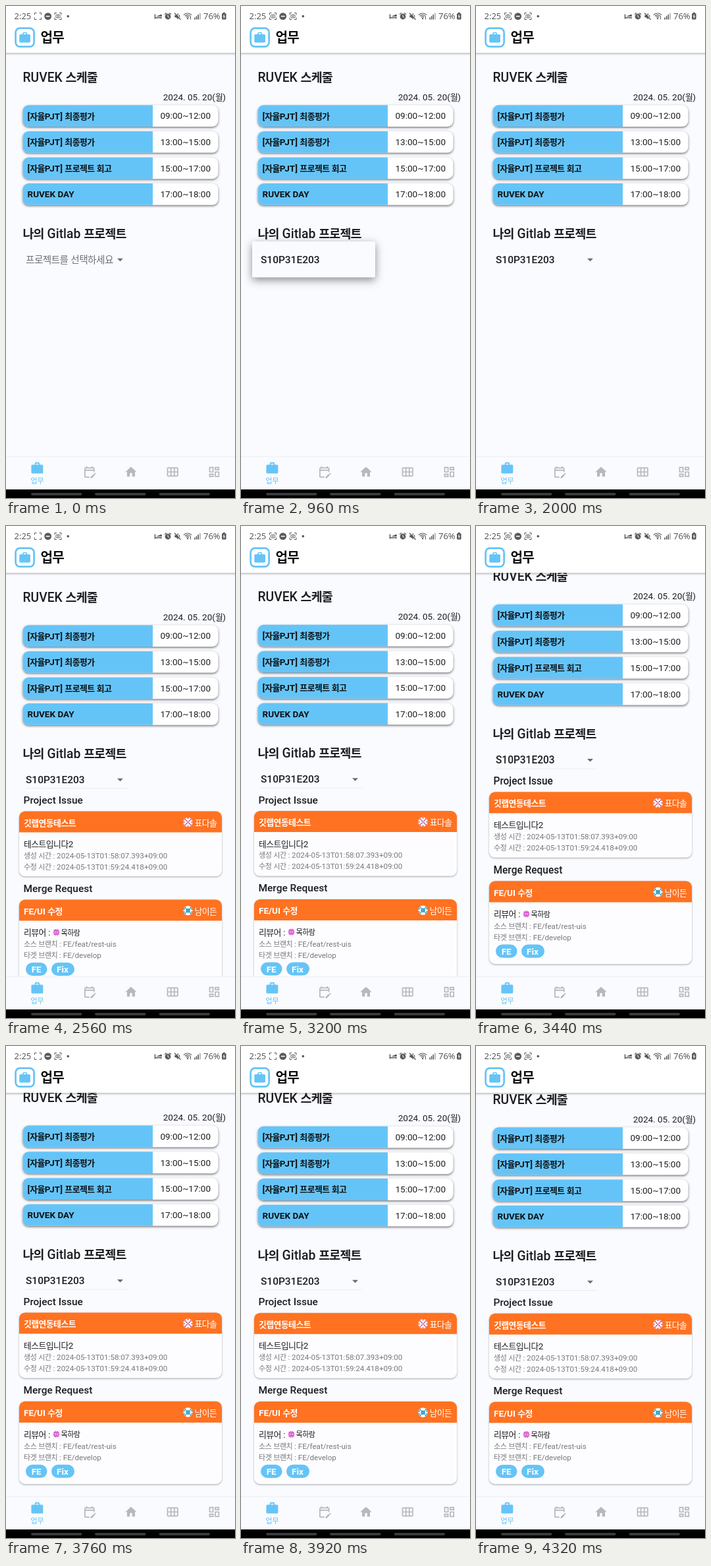
Animation of 348 by 746 pixels, one loop 4480 ms. Source, as an HTML page with a canvas:

```html
<!DOCTYPE html>
<html lang="ko">
<head>
<meta charset="utf-8">
<title>업무</title>
<style>
html, body { margin: 0; width: 100%; height: 100%; overflow: hidden; background: #fafbff; }
canvas { display: block; width: 348px; height: 746px; }
</style>
</head>
<body>
<canvas id="stage" width="348" height="746"></canvas>
<script>
const ctx = document.getElementById('stage').getContext('2d');
const LOOP = 4480, STEP = 80;
const BLUE = '#65c4f7', ORANGE = '#ff7221', PAGE = '#fafbff', GREY = '#b7b8bc', STATUS = '#58595d';
const INK = '#1c1d20', FAINT = '#77787c';
const TOP = 72, BOTTOM = 683;

const icons = {
  work: 'M20 6h-4V4c0-1.11-.89-2-2-2h-4c-1.11 0-2 .89-2 2v2H4c-1.11 0-1.99.89-1.99 2L2 19c0 1.11.89 2 2 2h16c1.11 0 2-.89 2-2V8c0-1.11-.89-2-2-2zm-6 0h-4V4h4v2z',
  plan: 'M12 22H5c-1.11 0-2-.9-2-2l.01-14c0-1.1.88-2 1.99-2h1V2h2v2h8V2h2v2h1c1.1 0 2 .9 2 2v6h-2v-2H5v10h7v2zM5 8h14V6H5zm17.13 8.99.71-.71c.39-.39.39-1.02 0-1.41l-.71-.71c-.39-.39-1.02-.39-1.41 0l-.71.71 2.12 2.12zm-.71.71-5.3 5.3H14v-2.12l5.3-5.3 2.12 2.12z',
  home: 'M10 20v-6h4v6h5v-8h3L12 3 2 12h3v8z',
  grid: 'M20 4H4c-1.1 0-2 .9-2 2v12c0 1.1.9 2 2 2h16c1.1 0 2-.9 2-2V6c0-1.1-.9-2-2-2zM8 11H4V6h4v5zm6 0h-4V6h4v5zm6 0h-4V6h4v5zM8 18H4v-5h4v5zm6 0h-4v-5h4v5zm6 0h-4v-5h4v5z',
  board: 'M21 3h-8v6h8zM19 5v2h-4V5zM11 3H3v10h8zM9 5v6H5V5zM21 11h-8v10h8zM19 13v6h-4v-6zM11 15H3v6h8zM9 17v2H5v-2z',
  mute: 'M3 9v6h4l6 6V3L7 9zM15 7q6 5 0 10z',
  bed: 'M1 8h3v9h19v4h-3v-1H4v2H1zM6 15 22 8q2 3 1 7z'
};

// Linear interpolation through [time, value] points
function track(t, points) {
  if (t <= points[0][0]) return points[0][1];
  for (let i = 1; i < points.length; i++) {
    const [t0, v0] = points[i - 1], [t1, v1] = points[i];
    if (t <= t1) return v0 + (v1 - v0) * (t - t0) / (t1 - t0);
  }
  return points[points.length - 1][1];
}

// Hangul runs are set slightly smaller and tighter than Latin; y is the middle of the line
function text(str, x, y, size, color = INK, weight = 400) {
  ctx.fillStyle = color;
  for (const run of str.match(/[가-힣]+|[^가-힣]+/g)) {
    const hangul = /[가-힣]/.test(run);
    const w = hangul && weight > 400 ? 700 : weight;
    ctx.font = hangul
      ? `${w} ${size * 0.95}px "Noto Sans CJK KR", "Noto Sans CJK", sans-serif`
      : `${w} ${size}px Roboto, sans-serif`;
    ctx.letterSpacing = hangul ? `${-size * 0.04}px` : '0px';
    ctx.fillText(run, x, y + size * 0.355);
    x += ctx.measureText(run).width;
  }
  ctx.letterSpacing = '0px';
}

function box(x, y, w, h, r, color) {
  ctx.beginPath();
  ctx.roundRect(x, y, w, h, r);
  ctx.fillStyle = color;
  ctx.fill();
}

function raised(x, y, w, h, r, color, shade, blur, drop) {
  ctx.save();
  ctx.shadowColor = `rgba(0,0,0,${shade})`;
  ctx.shadowBlur = blur;
  ctx.shadowOffsetY = drop;
  box(x, y, w, h, r, color);
  ctx.restore();
}

function disc(x, y, r, color) {
  ctx.beginPath();
  ctx.arc(x, y, r, 0, 7);
  ctx.fillStyle = color;
  ctx.fill();
}

function line(color, width, ...pts) {
  ctx.beginPath();
  for (let i = 0; i < pts.length; i += 2) ctx.lineTo(pts[i], pts[i + 1]);
  ctx.strokeStyle = color;
  ctx.lineWidth = width;
  ctx.stroke();
}

function icon(name, cx, cy, size, color) {
  ctx.save();
  ctx.translate(cx - size / 2, cy - size / 2);
  ctx.scale(size / 24, size / 24);
  ctx.fillStyle = color;
  ctx.fill(new Path2D(icons[name]), 'evenodd');
  ctx.restore();
}

// Mirrored block pattern; each mask holds the rows of one column
function avatar(cx, cy, r, color, masks) {
  ctx.save();
  disc(cx, cy, r, '#fff');
  ctx.clip();
  ctx.fillStyle = color;
  const u = r * 2 / 7;
  for (let c = 0; c < 7; c++)
    for (let row = 0; row < 7; row++)
      if (masks[Math.min(c, 6 - c)] >> row & 1)
        ctx.fillRect(cx - r + c * u, cy - r + row * u, u + 0.1, u + 0.1);
  ctx.restore();
}

function schedule() {
  text('RUVEK 스케줄', 25.5, 108, 19.33, INK, 500);
  text('2024. 05. 20(월)', 238.7, 138, 13.53);
  const rows = [
    ['[자율PJT] 최종평가', '09:00~12:00'],
    ['[자율PJT] 최종평가', '13:00~15:00'],
    ['[자율PJT] 프로젝트 회고', '15:00~17:00'],
    ['RUVEK DAY', '17:00~18:00']
  ];
  rows.forEach(([name, time], i) => {
    const y = 150.3 + i * 39.6;
    raised(25.5, y, 297, 32.7, 9, '#fff', 0.55, 3.5, 1.5);
    box(25.5, y, 197.5, 32.7, [9, 0, 0, 9], BLUE);
    text(name, 32.5, y + 16.5, 13.53, '#0d1114', 700);
    text(time, 234.5, y + 16.3, 13.53);
  });
}

function picker(chosen, loaded) {
  text('나의 Gitlab 프로젝트', 25.5, 344.8, 19.33, INK, 500);
  if (chosen) text('S10P31E203', 30, 384.4, 15.47, INK, 500);
  else text('프로젝트를 선택하세요', 30, 384.8, 15.47, '#707174');
  ctx.beginPath();
  ctx.moveTo(169, 382.7);
  ctx.lineTo(178, 382.7);
  ctx.lineTo(173.5, 387.2);
  ctx.fillStyle = '#6b6c70';
  ctx.fill();
  if (loaded) line('#e6e8ed', 0.8, 30, 397.6, 184, 397.6);
}

function card(y, h, title, owner, color, masks) {
  raised(20, y, 308, h, 9, '#fdfdff', 0.35, 2.5, 1);
  box(20, y, 308, 32, [9, 9, 0, 0], ORANGE);
  text(title, 27, y + 17.2, 13.53, '#fff', 700);
  avatar(276.5, y + 16.6, 7.2, color, masks);
  text(owner, 286.5, y + 17.2, 13.53, '#fff');
}

function issue() {
  text('Project Issue', 26.5, 415.8, 15.47, INK, 500);
  card(432.5, 98.8, '깃랩연동테스트', '표다솔', '#c9608a', [8, 34, 20, 73]);
  text('테스트입니다2', 27, 482.3, 13.53);
  text('생성 시간 : 2024-05-13T01:58:07.393+09:00', 27, 499.8, 11.6, FAINT);
  text('수정 시간 : 2024-05-13T01:59:24.418+09:00', 27, 516.8, 11.6, FAINT);
}

function chip(label, x, w, tx) {
  box(x, 662, w, 20, 10, BLUE);
  text(label, tx, 672.2, 13.53, '#fff', 700);
}

function merge() {
  text('Merge Request', 26.5, 549.4, 15.47, INK, 500);
  card(566.5, 124.8, 'FE/UI 수정', '남이든', '#2a9bc0', [20, 34, 28, 28]);
  text('리뷰어 :', 27, 616.3, 13.53);
  avatar(76.5, 616, 5.2, '#d94fd0', [42, 62, 119, 62]);
  text('목하람', 83.5, 616.4, 11.6);
  text('소스 브랜치 : FE/feat/rest-uis', 27, 634, 11.6, FAINT);
  text('타겟 브랜치 : FE/develop', 27, 651, 11.6, FAINT);
  chip('FE', 30, 32.5, 38.7);
  chip('Fix', 69, 35, 77);
}

function menu(t) {
  const alpha = track(t, [[80, 0], [160, 0.7], [240, 1], [1520, 1], [1600, 0.6], [1680, 0]]);
  if (!alpha) return;
  ctx.save();
  ctx.globalAlpha = alpha;
  raised(17, 357, 187, 54.5, 2, PAGE, 0.45, 13, 4);
  const press = track(t, [[1360, 0], [1440, 0.06], [1520, 0.1]]);
  box(17, 361, 187, 46, 0, `rgba(0,0,0,${press})`);
  ctx.globalAlpha = track(t, [[160, 0.2], [240, 1], [1520, 1], [1600, 0.3]]);
  text('S10P31E203', 30, 384.4, 15.47, INK, 500);
  ctx.restore();
}

function brackets(x, inner) {
  ctx.strokeStyle = STATUS;
  ctx.lineWidth = 1;
  ctx.setLineDash([3, 4, 3, 0]);
  ctx.strokeRect(x - 5, 10.5, 10, 10);
  ctx.setLineDash([]);
  if (!inner) return;
  ctx.beginPath();
  ctx.roundRect(x - 3, 13.3, 6, 4.6, 1);
  ctx.stroke();
  disc(x, 15.6, 1.1, STATUS);
}

function statusBar(t) {
  ctx.font = '13px "Noto Sans", sans-serif';
  ctx.fillStyle = STATUS;
  ctx.fillText('2:25', 12.5, 20);
  ctx.fillText('76%', 300, 20);
  const off = [[0, 160], [640, 960], [1680, 2000], [2560, 2880], [3760, 4320]];
  brackets(48.5, !off.some(([a, b]) => t >= a && t < b));
  disc(63.7, 15.6, 5.4, STATUS);
  line('#fff', 1.6, 60.8, 15.6, 66.6, 15.6);
  brackets(79, true);
  disc(94.3, 15.6, 1.8, STATUS);

  icon('bed', 231.2, 14.6, 12, STATUS);

  // alarm
  disc(246, 16, 4.4, STATUS);
  line('#fff', 1, 246, 13.4, 246, 16.3, 248, 17.4);
  line(STATUS, 1.3, 241, 12.8, 243.8, 10.6);
  line(STATUS, 1.3, 251, 12.8, 248.2, 10.6);

  // muted sound
  icon('mute', 261.2, 15.6, 13, STATUS);
  line('#fff', 0.9, 257.2, 10.2, 266.7, 20.2);
  line(STATUS, 1.3, 256, 10.8, 265.5, 20.8);

  // wireless and signal
  ctx.strokeStyle = STATUS;
  ctx.lineWidth = 1.2;
  for (const r of [3, 5.6, 8.2]) {
    ctx.beginPath();
    ctx.arc(276, 19.2, r, -2.4, -0.74);
    ctx.stroke();
  }
  disc(276, 19, 1.2, STATUS);
  line(STATUS, 1, 280.5, 15.5, 280.5, 20.5);
  for (let i = 0; i < 4; i++) {
    const h = 3 + i * 2.3;
    box(286 + i * 2.7, 20.5 - h, 1.6, h, 0.5, i < 3 ? STATUS : '#a9aaae');
  }

  // battery
  box(329.8, 9.8, 3, 2, 0, STATUS);
  box(328, 11, 6.6, 9.5, 1.5, STATUS);
  line('#fff', 1, 331.8, 12.8, 330, 16, 332.5, 15.6, 330.8, 18.8);
}

function header(t) {
  const fade = ctx.createLinearGradient(0, 71, 0, 75);
  fade.addColorStop(0, 'rgba(60,60,70,.3)');
  fade.addColorStop(1, 'rgba(60,60,70,0)');
  ctx.fillStyle = fade;
  ctx.fillRect(0, 71, 348, 4);
  box(0, 0, 348, 71, 0, '#fff');
  ctx.beginPath();
  ctx.roundRect(14.6, 33.6, 28, 28, 6.5);
  ctx.strokeStyle = BLUE;
  ctx.lineWidth = 2.7;
  ctx.stroke();
  icon('work', 28.6, 48, 20, BLUE);
  text('업무', 52.5, 47.5, 21.3, '#0c0d0f', 700);
  statusBar(t);
}

function footer() {
  box(0, BOTTOM, 348, 50, 0, '#fafbfe');
  box(0, BOTTOM, 348, 1, 0, '#eeeff3');
  icon('work', 47.4, 700.8, 21.5, BLUE);
  text('업무', 37.3, 720, 11.9, BLUE);
  ['plan', 'home', 'grid', 'board'].forEach((name, i) =>
    icon(name, 126.8 + i * 63.2, 706.5, 20.7, GREY));
  box(0, 733, 348, 13, 0, '#000');
  for (const x of [38, 135, 232.5]) box(x, 738.3, 77.5, 3.6, 1.8, '#3d3d3f');
}

function draw(t) {
  const scroll = track(t, [[3120, 0], [3200, 0.5], [3280, 9], [3360, 21], [3440, 27]]);
  const pull = track(t, [[3360, 0], [3440, 5], [3520, 5.4], [3680, 4], [3760, 3], [4160, 0]]);
  box(0, 0, 348, 746, 0, PAGE);

  // the list stretches away from its lower edge when pulled past the end
  ctx.save();
  ctx.beginPath();
  ctx.rect(0, TOP - 1, 348, BOTTOM - TOP + 1);
  ctx.clip();
  ctx.translate(0, BOTTOM);
  ctx.scale(1, 1 + pull / (BOTTOM - TOP));
  ctx.translate(0, -BOTTOM - scroll);
  schedule();
  picker(t >= 1600, t >= 2160);
  if (t >= 2160) issue();
  if (t >= 2240) merge();
  ctx.restore();

  menu(t);
  header(t);
  footer();
}

const start = performance.now();
function tick() {
  const t = (performance.now() - start) % LOOP;
  draw(Math.floor(t / STEP) * STEP);
  requestAnimationFrame(tick);
}
tick();
</script>
</body>
</html>
```
